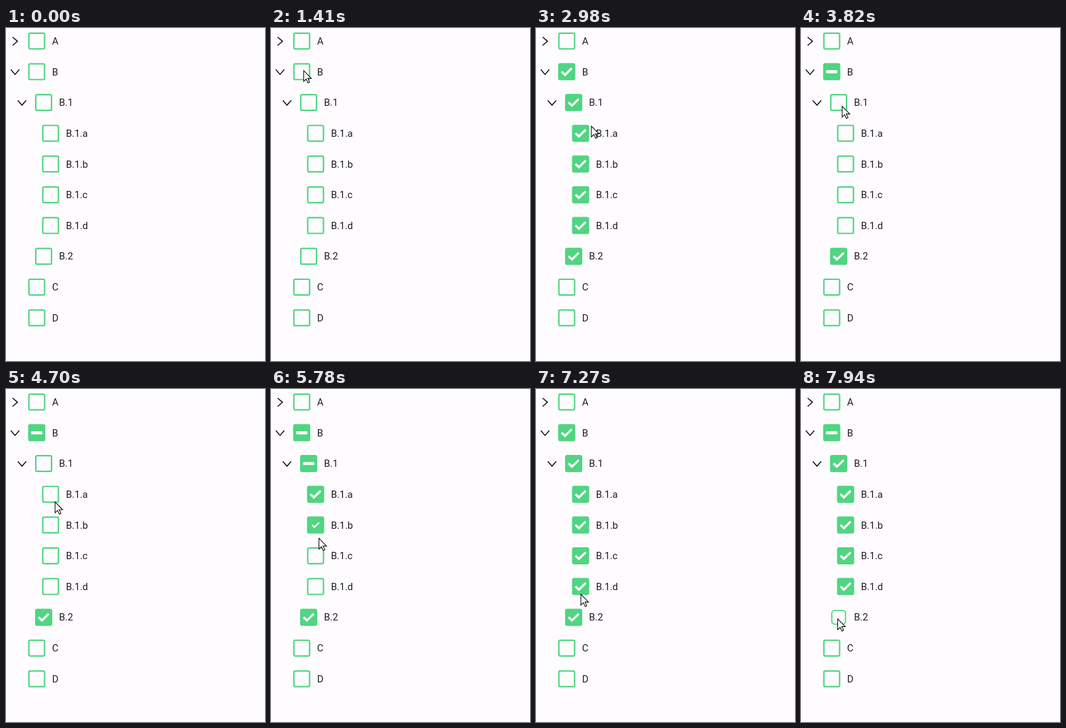
Recreate the animation shown at these times as an HTML page. Size 392x505 px, loop 8000 ms.

```html
<!DOCTYPE html>
<html lang="en">
<head>
<meta charset="utf-8">
<title>Checkbox tree</title>
<style>
  html, body { margin: 0; width: 100%; height: 100%; overflow: hidden; background: #fffcff; }
  svg { display: block; width: 392px; height: 505px; }
  text { font: 14.7px Roboto, sans-serif; fill: #1d1b20; }
  .chevron { fill: none; stroke: #111; stroke-width: 1.5; }
  .box { stroke: #51d582; }
  .check { fill: none; stroke: #fff; stroke-width: 3.3; }
  .minus { fill: #fff; }
  #cursor { fill: #fff; stroke: #111; stroke-width: 1.1; }
</style>
</head>
<body>
<svg viewBox="0 0 392 505">
  <g id="tree"></g>
  <path id="cursor" d="M.5 .7V17L4.3 13.4L7 19.2L9.4 18.1L6.8 12.4H12Z"/>
</svg>
<script>
const LOOP = 8000, ENTER = 390, STEP = 68;
const PRESS = 120, RELEASE = 90, GROW = 160, SHRINK = 0.13, LINGER = 40;
const GREEN = '#51d582', PAPER = '#fffcff';

const rows = ['A', 'B', 'B.1', 'B.1.a', 'B.1.b', 'B.1.c', 'B.1.d', 'B.2', 'C', 'D'];
const collapsed = ['A'];
const hasChildren = name => rows.some(other => other.startsWith(name + '.'));
const leaves = rows.filter(name => !hasChildren(name));

// Where the pointer rests; it leaves shortly after clicking a row
const stops = [
  { x: 361, y: 436, arrive: ENTER },
  { x: 49, y: 64, arrive: 1140, leave: 1990, click: 'B' },
  { x: 148, y: 157, arrive: 2500 },
  { x: 75, y: 147, arrive: 3100, leave: 3200 },
  { x: 58, y: 113, arrive: 3490, leave: 3700, click: 'B.1' },
  { x: 86, y: 150, arrive: 4090, leave: 4160 },
  { x: 70, y: 177, arrive: 4910, leave: 5140, click: 'B.1.a' },
  { x: 75, y: 206, arrive: 5310, leave: 5690, click: 'B.1.b' },
  { x: 70, y: 240, arrive: 5820, leave: 6290, click: 'B.1.c' },
  { x: 72, y: 297, arrive: 6700, leave: 7040, click: 'B.1.d' },
  { x: 55, y: 348, arrive: 7680, leave: 7975, click: 'B.2' }
];
const clicks = stops.filter(s => s.click).map(s => ({ at: s.leave - LINGER, row: s.click }));

const clamp = v => Math.max(0, Math.min(1, v));
const smooth = u => u * u * (3 - 2 * u);
const easeOut = u => 1 - (1 - u) ** 4;
const mix = (a, b, k) => a + (b - a) * k;
const within = (leaf, name) => leaf === name || leaf.startsWith(name + '.');

function chevron(name) {
  if (!hasChildren(name) && !collapsed.includes(name)) return '';
  const turn = collapsed.includes(name) ? 0 : 90;
  return `<path class="chevron" d="M-3.7 -6.4L3.7 0L-3.7 6.4" transform="translate(-32.8 .4) rotate(${turn})"/>`;
}

document.getElementById('tree').innerHTML = rows.map((name, i) => {
  const x = 46.5 + (name.split('.').length - 1) * 10.5, y = 19.7 + i * 46.65;
  return `<g transform="translate(${x} ${y})">
    ${chevron(name)}
    <rect class="box"/>
    <path class="check" d="M-7.7 -.2L-2.6 4.8L7.7 -5.4"/>
    <rect class="minus" x="-8.7" y="-2.3" width="17.4" height="4.6" rx="1.5"/>
    <text x="23.2" y="5.2">${name}</text>
  </g>`;
}).join('');

const items = [...document.querySelectorAll('#tree > g')].map((g, i) => ({
  name: rows[i],
  box: g.querySelector('.box'), check: g.querySelector('.check'), minus: g.querySelector('.minus')
}));
const cursor = document.getElementById('cursor');

// State of a row: 0 empty, 1 checked, 2 partial
function stateOf(name, on) {
  const own = leaves.filter(leaf => within(leaf, name));
  const count = own.filter(leaf => on.has(leaf)).length;
  return count === 0 ? 0 : count === own.length ? 1 : 2;
}

// Replays the clicks up to t; filledAt is when each row last left the empty state
function treeAt(t) {
  const on = new Set(), filledAt = {};
  for (const { at, row } of clicks.filter(c => c.at <= t)) {
    const before = rows.map(name => stateOf(name, on));
    const checked = stateOf(row, on) !== 1;
    for (const leaf of leaves) if (within(leaf, row)) checked ? on.add(leaf) : on.delete(leaf);
    rows.forEach((name, i) => { if (!before[i]) filledAt[name] = at; });
  }
  return { on, filledAt };
}

function pressAmount(name, t) {
  return Math.max(0, ...clicks.filter(c => c.row === name).map(({ at }) =>
    t < at ? clamp((t - at + PRESS) / RELEASE) : clamp(1 - (t - at) / RELEASE)));
}

function pointerAt(t) {
  const i = Math.max(0, stops.findLastIndex(s => s.arrive <= t));
  const from = stops[i], to = stops[i + 1] || from, leave = from.leave ?? from.arrive;
  const u = to === from ? 0 : clamp((t - leave) / (to.arrive - leave));
  return [mix(from.x, to.x, smooth(u)), mix(from.y, to.y, i ? smooth(u) : easeOut(u))];
}

function setAttributes(node, values) {
  for (const key in values) node.setAttribute(key, values[key]);
}

function draw(time) {
  const t = ENTER + Math.floor((time - ENTER) / STEP) * STEP;
  const { on, filledAt } = treeAt(t);
  for (const { name, box, check, minus } of items) {
    const state = stateOf(name, on), press = pressAmount(name, t), size = 23.8 * (1 - SHRINK * press);
    setAttributes(box, {
      x: -size / 2, y: -size / 2, width: size, height: size,
      rx: 2 + 2.5 * press, fill: state ? GREEN : PAPER, 'stroke-width': 2.2 - 0.3 * press
    });
    const grow = `scale(${state ? clamp((t - filledAt[name]) / GROW) : 0})`;
    setAttributes(check, { transform: grow, visibility: state === 1 ? 'visible' : 'hidden' });
    setAttributes(minus, { transform: grow, visibility: state === 2 ? 'visible' : 'hidden' });
  }
  const [x, y] = pointerAt(t);
  setAttributes(cursor, { transform: `translate(${x} ${y})`, visibility: t < ENTER ? 'hidden' : 'visible' });
}

const begin = performance.now();
function tick() {
  draw((performance.now() - begin) % LOOP);
  requestAnimationFrame(tick);
}
tick();
</script>
</body>
</html>
```
